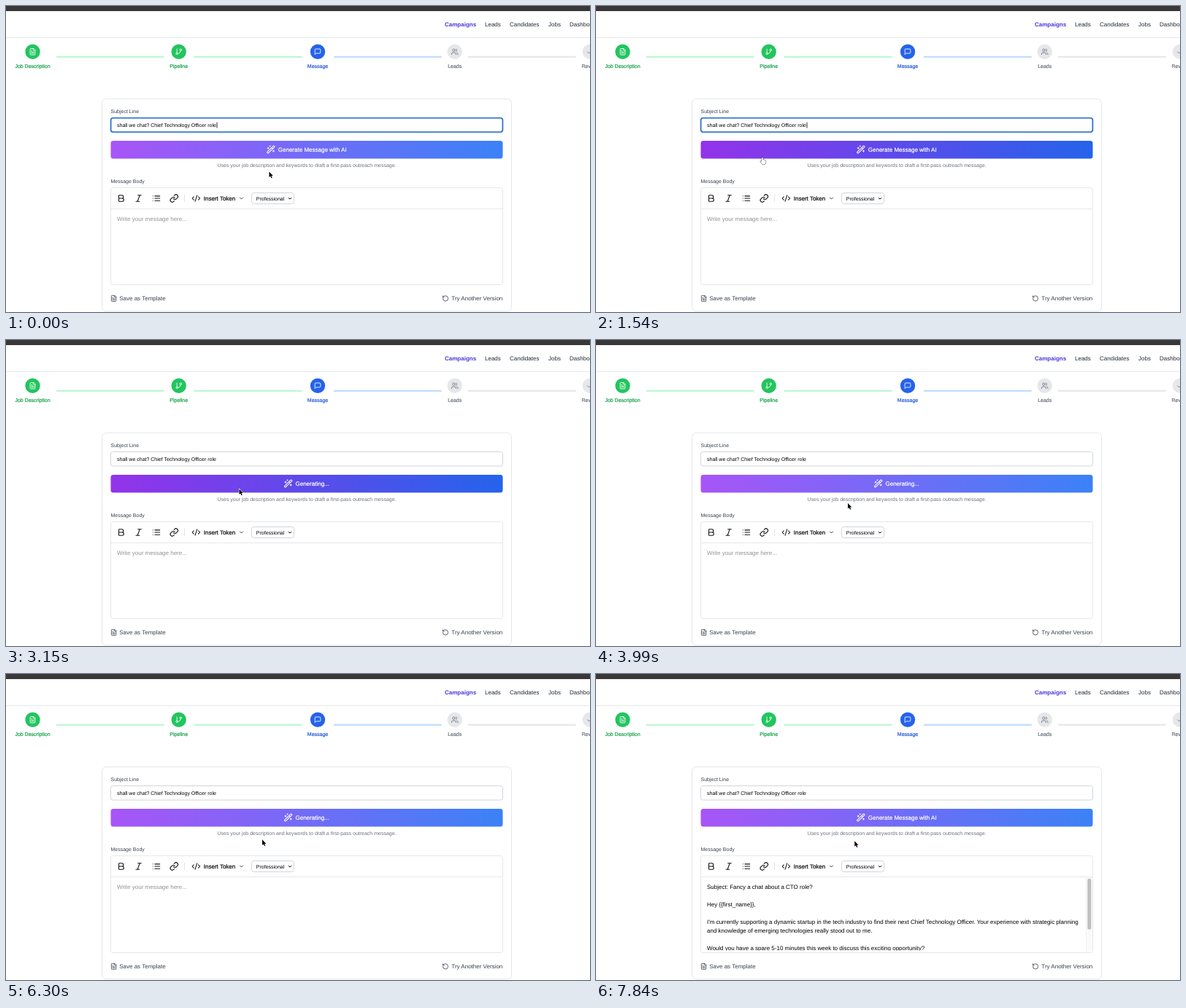
Write an HTML page with a canvas that moves like this. It is 800 px wide and 420 px high and loops after 8 s.

```html
<!DOCTYPE html>
<html lang="en">
<head>
<meta charset="utf-8">
<title>Campaign message</title>
<style>
html, body { margin: 0; width: 100%; height: 100%; overflow: hidden; background: #fff; }
canvas { display: block; width: 800px; height: 420px; }
</style>
</head>
<body>
<canvas id="stage" width="800" height="420"></canvas>
<script>
const ctx = document.getElementById('stage').getContext('2d');
const LOOP = 8000, TICK = 70;
const CLICK = 2520, HAND_ON = 1400, HAND_OFF = 2590, HOVER_OUT = 3360, DONE = 7000;

const icons = {
  file: 'M15 2H6a2 2 0 0 0-2 2v16a2 2 0 0 0 2 2h12a2 2 0 0 0 2-2V7ZM14 2v4a2 2 0 0 0 2 2h4M10 9H8M16 13H8M16 17H8',
  branch: 'M6 3v12M21 6a3 3 0 1 1-6 0a3 3 0 1 1 6 0M9 18a3 3 0 1 1-6 0a3 3 0 1 1 6 0M18 9a9 9 0 0 1-9 9',
  message: 'M21 15a2 2 0 0 1-2 2H7l-4 4V5a2 2 0 0 1 2-2h14a2 2 0 0 1 2 2z',
  users: 'M16 21v-2a4 4 0 0 0-4-4H6a4 4 0 0 0-4 4v2M13 7a4 4 0 1 1-8 0a4 4 0 1 1 8 0M22 21v-2a4 4 0 0 0-3-3.87M16 3.13a4 4 0 0 1 0 7.75',
  check: 'M20 6 9 17l-5-5',
  bold: 'M6 12h9a4 4 0 0 1 0 8H7a1 1 0 0 1-1-1V5a1 1 0 0 1 1-1h7a4 4 0 0 1 0 8',
  italic: 'M19 4h-9M14 20H5M15 4 9 20',
  list: 'M3 12h.01M3 18h.01M3 6h.01M8 12h13M8 18h13M8 6h13',
  link: 'M10 13a5 5 0 0 0 7.54.54l3-3a5 5 0 0 0-7.07-7.07l-1.72 1.71M14 11a5 5 0 0 0-7.54-.54l-3 3a5 5 0 0 0 7.07 7.07l1.71-1.71',
  code: 'm18 16 4-4-4-4M6 8l-4 4 4 4M14.5 4l-5 16',
  chevron: 'm6 9 6 6 6-6',
  undo: 'M3 12a9 9 0 1 0 9-9 9.75 9.75 0 0 0-6.74 2.74L3 8M3 3v5h5',
  wand: 'm21.64 3.64-1.28-1.28a1.21 1.21 0 0 0-1.72 0L2.36 18.64a1.21 1.21 0 0 0 0 1.72l1.28 1.28a1.2 1.2 0 0 0 1.72 0L21.64 5.36a1.2 1.2 0 0 0 0-1.72M14 7l3 3M5 6v4M19 14v4M10 2v2M7 8H3M21 16h-4M11 3H9'
};
for (const name in icons) icons[name] = new Path2D(icons[name]);

const arrow = new Path2D('M0 0V7.6L1.7 6.1 2.9 8.8 4.2 8.2 3 5.6H5.3Z');
const hand = new Path2D('M-1 .8Q-1 0-.2 0 .6 0 .6 .8V3.6Q1.2 3 2 3.7 2.9 3.3 3.4 4.1 4.6 4 4.6 5.2V6.5Q4.4 8 3.7 9.5H-.4Q-1.5 8-2.8 6.2-3.2 5-2.2 5.2L-1 6.1Z');

// time, x, y of the pointer tip
const path = [
  [0, 360.5, 227.5], [70, 360.5, 227.5], [1050, 199.5, 212], [2310, 284.5, 199],
  [2590, 285, 199], [3150, 319.5, 204.5], [3990, 345, 224], [4410, 347.5, 226],
  [4970, 348.5, 226.5], [5740, 350.3, 227], [6300, 351, 227.3], [7000, 351, 227.3],
  [7350, 353.5, 228.6], [7840, 354.2, 229.2], [LOOP, 354.2, 229.2]
];

const body = [
  'Subject: Fancy a chat about a CTO role?', '',
  'Hey {{first_name}},', '',
  "I'm currently supporting a dynamic startup in the tech industry to find their next Chief Technology Officer. Your experience with strategic planning",
  'and knowledge of emerging technologies really stood out to me.', '',
  'Would you have a spare 5-10 minutes this week to discuss this exciting opportunity?'
];

const clamp = v => Math.max(0, Math.min(1, v));
const ease = u => u * u * (3 - 2 * u);

function pointerAt(t) {
  const i = Math.max(1, path.findIndex(k => k[0] > t));
  const [t0, x0, y0] = path[i - 1], [t1, x1, y1] = path[i];
  const u = ease(clamp((t - t0) / (t1 - t0)));
  return [x0 + (x1 - x0) * u, y0 + (y1 - y0) * u];
}

function text(str, x, y, size, color, { weight = 'normal', medium = false, align = 'left' } = {}) {
  ctx.font = `${weight} ${size}px "Liberation Sans", Arial, sans-serif`;
  ctx.textAlign = align;
  ctx.fillStyle = color;
  ctx.fillText(str, x, y);
  if (medium) {
    ctx.strokeStyle = color;
    ctx.lineWidth = 0.22;
    ctx.strokeText(str, x, y);
  }
}

function icon(name, cx, cy, size, color, weight = 2) {
  const k = size / 24;
  ctx.save();
  ctx.translate(cx - size / 2, cy - size / 2);
  ctx.scale(k, k);
  ctx.strokeStyle = color;
  ctx.lineWidth = weight;
  ctx.lineCap = ctx.lineJoin = 'round';
  ctx.stroke(icons[name]);
  ctx.restore();
}

function rect(x, y, w, h, color) {
  ctx.fillStyle = color;
  ctx.fillRect(x, y, w, h);
}

function box(x, y, w, h, r, { fill, line, width = 1 }) {
  ctx.beginPath();
  ctx.roundRect(x, y, w, h, r);
  if (fill) { ctx.fillStyle = fill; ctx.fill(); }
  if (line) { ctx.strokeStyle = line; ctx.lineWidth = width; ctx.stroke(); }
}

function header() {
  rect(0, 0, 800, 7, '#393738');
  rect(0, 43, 800, 1, '#e5e7eb');
  text('Campaigns', 601, 27.8, 8, '#4a36dc', { weight: 'bold' });
  [['Leads', 656], ['Candidates', 690], ['Jobs', 743], ['Dashboard', 772]]
    .forEach(([s, x]) => text(s, x, 27.8, 8, '#1f2937'));
}

function steps() {
  const green = '#22c55e', grey = '#e5e7eb';
  [[69, '#bbf7d0'], [257.5, '#bbf7d0'], [449, '#bfdbfe'], [633, grey]]
    .forEach(([x, c]) => rect(x, 68.7, 147.7, 2.2, c));
  [
    ['Job Description', 36.5, 'file', green, '#fff', '#16a34a'],
    ['Pipeline', 236.7, 'branch', green, '#fff', '#16a34a'],
    ['Message', 427, 'message', '#2563eb', '#fff', '#2459d8'],
    ['Leads', 614.7, 'users', grey, '#6b7280', '#6b7280'],
    ['Review', 800, 'check', grey, '#6b7280', '#6b7280']
  ].forEach(([label, x, name, fill, ink, color]) => {
    ctx.beginPath();
    ctx.arc(x, 62.8, 10.2, 0, Math.PI * 2);
    ctx.fillStyle = fill;
    ctx.fill();
    icon(name, x, 62.8, 10.2, ink);
    text(label, x, 84.5, 7, color, { medium: true, align: 'center' });
  });
}

function subject(focused) {
  text('Subject Line', 143.5, 147.1, 7, '#374151');
  if (focused) {
    box(143.5, 153.5, 537, 19.6, 3, { line: 'rgba(96,165,250,.5)', width: 2.6 });
    box(143.8, 153.8, 536.4, 19, 2.8, { fill: '#fff', line: '#1d5fb4', width: 1.3 });
    rect(288.6, 159.5, 0.8, 8, '#000');
  } else {
    box(143.5, 153.5, 537, 19.5, 3, { fill: '#fff', line: '#d1d5db' });
  }
  text('shall we chat? Chief Technology Officer role', 152, 165.8, 7, '#000');
}

function button(hover, busy) {
  const mix = (a, b) => `rgb(${a.map((v, i) => Math.round(v + (b[i] - v) * hover))})`;
  const g = ctx.createLinearGradient(143.5, 0, 680.5, 0);
  g.addColorStop(0, mix([168, 85, 247], [147, 51, 234]));
  g.addColorStop(1, mix([59, 130, 246], [37, 99, 235]));
  box(143.5, 185, 537, 24.4, 3.5, { fill: g });
  icon('wand', busy ? 386.6 : 362.8, 197, 12.4, '#fff');
  text(busy ? 'Generating...' : 'Generate Message with AI', busy ? 396.5 : 372.8, 199.6, 8, '#fff', { medium: true });
  text('Uses your job description and keywords to draft a first-pass outreach message.',
    412, 220.5, 7, '#6b7280', { align: 'center' });
}

function editor(done) {
  const ink = '#111';
  text('Message Body', 143.5, 242.5, 7, '#374151');
  box(143.5, 249.5, 537, 133, 3, { line: '#e5e7eb' });
  rect(144, 278, 536, 1, '#e5e7eb');
  [['bold', 157.7], ['italic', 181.7], ['list', 206], ['link', 230.3], ['code', 260.4]]
    .forEach(([name, x]) => icon(name, x, 264, 12.6, ink));
  rect(244, 259, 1, 10, '#e2e4e8');
  text('Insert Token', 270.8, 266.6, 8, ink, { medium: true });
  icon('chevron', 322.5, 264, 8, ink, 2.4);
  box(336.5, 256.5, 58, 15, 3, { fill: '#fff', line: '#d1d5db' });
  text('Professional', 342.8, 266.5, 7, '#000');
  icon('chevron', 389, 264.2, 7, '#000', 3.4);

  if (!done) {
    text('Write your message here...', 152, 295, 8, '#929292');
    return;
  }
  ctx.save();
  ctx.beginPath();
  ctx.rect(144, 279, 536, 100.6);
  ctx.clip();
  body.forEach((line, i) => text(line, 152, 295 + i * 12.07, 8, '#000'));
  ctx.restore();
  rect(671.5, 279, 8.5, 103, '#fafafa');
  rect(671, 279, 0.6, 103, '#e8e8e8');
  box(673.3, 280.8, 5, 70, 2.5, { fill: '#bfbfbf' });
}

function footer() {
  const ink = '#374151';
  icon('file', 147.6, 401.4, 9.6, ink);
  text('Save as Template', 155.2, 403.9, 8, ink);
  icon('undo', 602, 401.4, 9.6, ink);
  text('Try Another Version', 680.3, 403.9, 8, ink, { align: 'right' });
}

function pointer(t) {
  const [x, y] = pointerAt(t);
  const isHand = t >= HAND_ON && t < HAND_OFF;
  ctx.save();
  ctx.translate(x, y);
  ctx.lineJoin = 'round';
  ctx.strokeStyle = isHand ? '#000' : '#fff';
  ctx.fillStyle = isHand ? '#fff' : '#000';
  ctx.lineWidth = isHand ? 0.8 : 1.2;
  ctx.stroke(isHand ? hand : arrow);
  ctx.fill(isHand ? hand : arrow);
  ctx.restore();
}

function draw(t) {
  const hover = clamp((t - HAND_ON) / 140) - clamp((t - HOVER_OUT) / 140);
  rect(0, 0, 800, 420, '#fff');
  ctx.textRendering = 'geometricPrecision';
  header();
  steps();
  box(131.5, 127.5, 561, 291.5, 6, { line: '#e5e7eb' });
  subject(t < CLICK);
  button(hover, t >= CLICK && t < DONE);
  editor(t >= DONE);
  footer();
  pointer(t);
}

const start = performance.now();
function frame() {
  const t = (performance.now() - start) % LOOP;
  draw(Math.floor(t / TICK) * TICK);
  requestAnimationFrame(frame);
}
frame();
</script>
</body>
</html>
```
